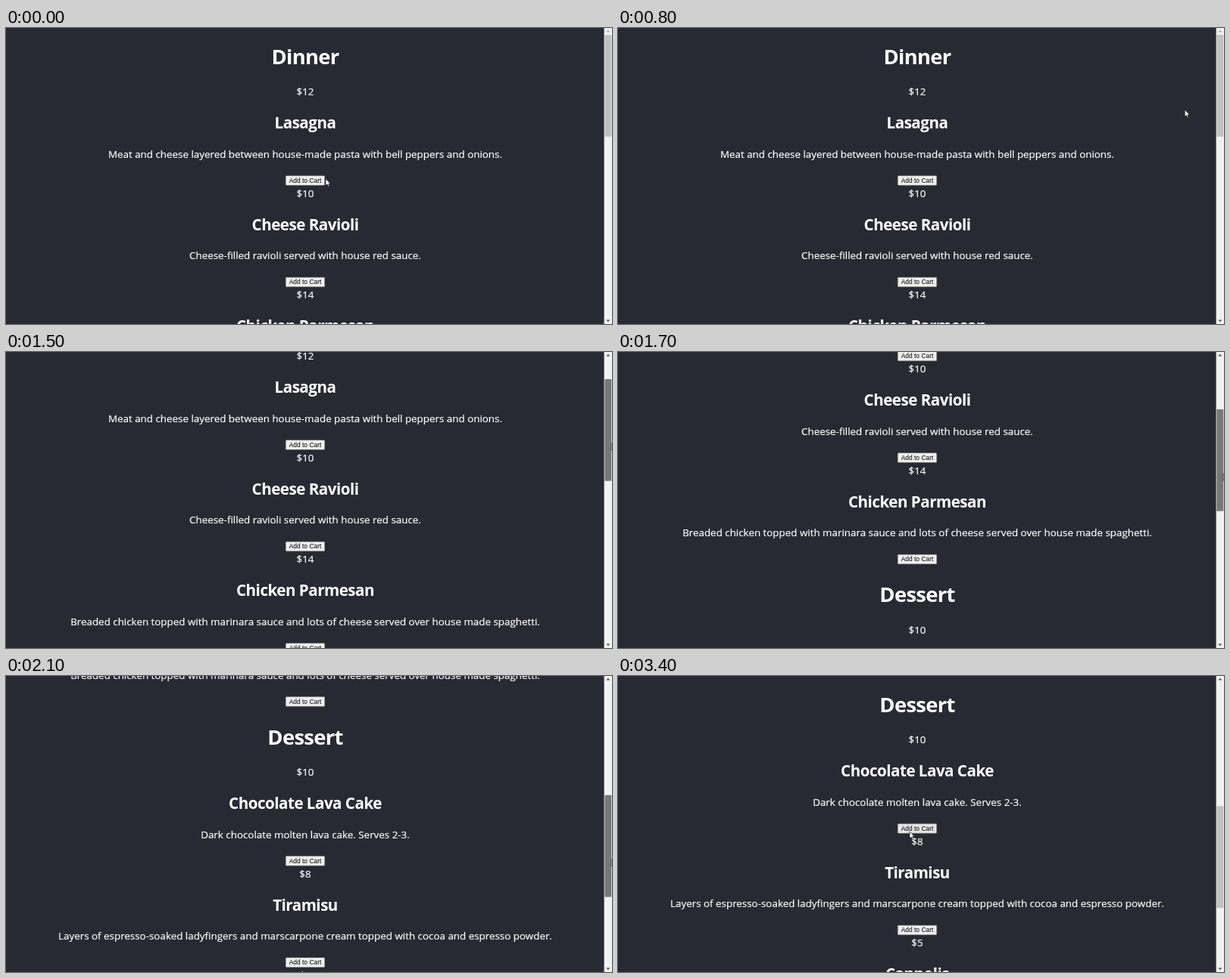
Write an HTML page that moves like this. It is 800 px wide and 392 px high and loops after 3500 ms.

```html
<!DOCTYPE html>
<html lang="en">
<head>
<meta charset="utf-8">
<title>Menu</title>
<style>
  html, body { margin: 0; width: 100%; height: 100%; overflow: hidden; background: #282a33; }
  svg { display: block; }
  text { fill: #fff; text-anchor: middle; font-family: "Open Sans", "Noto Sans", sans-serif; }
  .title, .name { font-weight: 700; letter-spacing: -.025em; }
  .title { font-size: 27.4px; }
  .name { font-size: 20.6px; }
  .body { font-size: 13.38px; stroke: #fff; stroke-width: .2px; }
  .label { font: 8.45px "Liberation Sans", Arial, sans-serif; fill: #000; }
</style>
</head>
<body>
<svg width="800" height="392" viewBox="0 0 800 392">
  <g id="page"></g>
  <rect x="789.6" width="10.4" height="392" fill="#f1f1f1"/>
  <path id="up" d="M792.4 5.4h5l-2.5 -2.7z"/>
  <path d="M792.4 386.6h5l-2.5 2.7z" fill="#505050"/>
  <rect id="thumb" x="790.4" width="8.9" height="134.8"/>
  <path id="cursor" d="M0 0V9.2L2.1 7.3L3.5 10.4L5 9.7L3.6 6.7H6.4Z"
        fill="#fff" stroke="#000" stroke-width=".6"/>
</svg>
<script>
const LOOP = 3500, STEP = 100, CENTER = 395, ROW = 134.5, SECTION = 480;
const THUMB_RATIO = .3403;
const BUTTON = { x: 369.3, width: 51.4, height: 12.6 };
const menu = [
  ["Dinner",
    [12, "Lasagna", "Meat and cheese layered between house-made pasta with bell peppers and onions."],
    [10, "Cheese Ravioli", "Cheese-filled ravioli served with house red sauce."],
    [14, "Chicken Parmesan", "Breaded chicken topped with marinara sauce and lots of cheese served over house made spaghetti."]],
  ["Dessert",
    [10, "Chocolate Lava Cake", "Dark chocolate molten lava cake. Serves 2-3."],
    [8, "Tiramisu", "Layers of espresso-soaked ladyfingers and marscarpone cream topped with cocoa and espresso powder."],
    [5, "Cannolis", ""]],
];
const drag = [[1200, 0], [1500, 79], [1700, 196.5], [1900, 347], [2300, SECTION]];

const $ = id => document.getElementById(id);
const page = $("page"), up = $("up"), thumb = $("thumb"), cursor = $("cursor");
const buttons = [];

function add(tag, attrs, content = "") {
  const el = document.createElementNS("http://www.w3.org/2000/svg", tag);
  for (const key in attrs) el.setAttribute(key, attrs[key]);
  el.textContent = content;
  return page.appendChild(el);
}
const write = (kind, y, content) => add("text", { class: kind, x: CENTER, y }, content);

menu.forEach(([title, ...dishes], s) => {
  const top = s * SECTION;
  write("title", top + 47.8, title);
  dishes.forEach(([price, name, about], i) => {
    const row = top + i * ROW, y = row + 195.7;
    write("body", row + 89.3, "$" + price);
    write("name", row + 133.4, name);
    write("body", row + 171.8, about);
    const el = add("rect", { ...BUTTON, y, rx: 1, stroke: "#767676", "stroke-width": .5 });
    buttons.push({ el, y });
    write("label", y + 9.2, "Add to Cart");
  });
});

// 0 before start, 1 after end, smooth between
function ease(t, start, end) {
  const u = Math.min(1, Math.max(0, (t - start) / (end - start)));
  return u * u * (3 - 2 * u);
}

// Smooth curve through [time, value] points, at rest at both ends
function spline(points, t) {
  const last = points.length - 1;
  const slope = i => i <= 0 || i >= last ? 0 :
    (points[i + 1][1] - points[i - 1][1]) / (points[i + 1][0] - points[i - 1][0]);
  if (t <= points[0][0]) return points[0][1];
  const i = points.findIndex(p => p[0] > t) - 1;
  if (i < 0) return points[last][1];
  const [t0, a] = points[i], [t1, b] = points[i + 1], d = t1 - t0, u = (t - t0) / d;
  return a + (b - a) * ease(t, t0, t1)
    + d * u * (1 - u) * (slope(i) * (1 - u) - slope(i + 1) * u);
}

// The pointer goes to the scrollbar, rides the thumb, leaves it, then seeks a button
function pointer(t, shift) {
  const pos = [422, 199.5];
  const move = (start, end, ...to) =>
    to.forEach((v, i) => pos[i] += (v - pos[i]) * ease(t, start, end));
  move(400, 920, 799.2, 94 + shift);
  move(2300, 2600, 632.5, 204);
  move(3000, 3400, 385, 206);
  return pos;
}

function draw() {
  const t = Math.floor(performance.now() % LOOP / STEP) * STEP;
  const scroll = spline(drag, t), shift = scroll * THUMB_RATIO;
  const [x, y] = pointer(t, shift);
  const dragging = t >= 1200 && t <= 2300;
  page.setAttribute("transform", `translate(0 ${-scroll})`);
  cursor.setAttribute("transform", `translate(${x} ${y})`);
  thumb.setAttribute("y", 9 + shift);
  thumb.setAttribute("fill", dragging ? "#787878" : x > 790 ? "#a8a8a8" : "#c1c1c1");
  up.setAttribute("fill", scroll ? "#505050" : "#a3a3a3");
  for (const b of buttons) {
    const dx = x - BUTTON.x, dy = y + scroll - b.y;
    const hover = dx > 0 && dx < BUTTON.width && dy > 0 && dy < BUTTON.height;
    b.el.setAttribute("fill", hover ? "#e5e5e5" : "#efefef");
  }
  requestAnimationFrame(draw);
}
draw();
</script>
</body>
</html>
```
